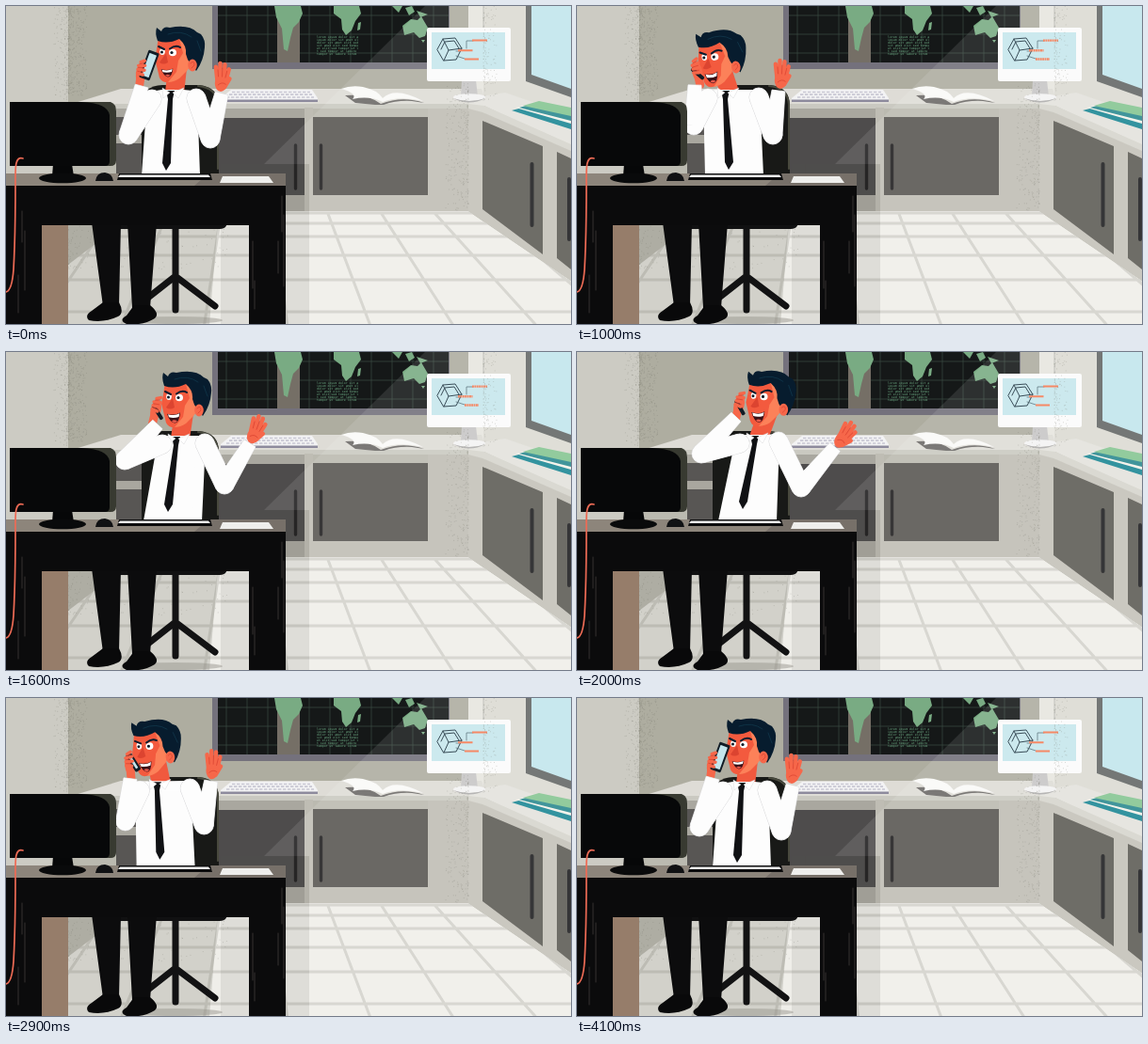
Write an HTML page that moves like this. It is 600 px wide and 338 px high and loops after 4200 ms.

```html
<!DOCTYPE html>
<html lang="en">
<head>
<meta charset="utf-8">
<title>Office call</title>
<style>
html, body { margin: 0; width: 100%; height: 100%; overflow: hidden; background: #aeada0; }
svg { display: block; width: 100%; height: 100%; }
.line { fill: none; stroke-linecap: round; stroke-linejoin: round; }
.green { fill: #79ab83; }
.tiny { font: 3.2px "DejaVu Sans Mono", monospace; fill: #6fae86; }
.skin { fill: #f6674a; }
.finger { stroke: #f6674a; stroke-width: 4.4; }
.crease { stroke: #d8402f; stroke-width: .7; }
.sleeve { fill: #fdfdfd; }
.seam { fill: none; stroke: #d8d8da; stroke-width: 1; }
</style>
</head>
<body>
<svg viewBox="0 0 600 338" preserveAspectRatio="none">
<defs>
  <clipPath id="floorClip"><path d="M0 218H491L600 292V338H0Z"/></clipPath>
  <clipPath id="screenClip"><path d="M225 0H470V60H225Z"/></clipPath>
</defs>

<!-- walls and window -->
<path fill="#aeada0" d="M0 0H500V230H0Z"/>
<path fill="#cccbc3" d="M0 0H66V280H0Z"/>
<path fill="#dbdad2" d="M491 0H600V160H491Z"/>
<path fill="#e6e5df" d="M491 0H507V100H491Z"/>
<path fill="#646866" d="M552 0H600V97L552 80Z"/>
<path fill="#c2e5ec" d="M558 0H600V88L558 73Z"/>

<!-- floor -->
<g clip-path="url(#floorClip)">
  <path fill="#efeee9" d="M0 218H600V338H0Z"/>
  <path id="tiles" class="line" stroke="#d3d2cc" stroke-width="3"/>
</g>
<path fill="#c0beb5" d="M0 218H140L66 275H0Z"/>
<path fill="#77746a" opacity=".24" d="M66 218H226L216 338H66Z"/>

<!-- wall screen -->
<path fill="#74717c" d="M219 0H471V67H219Z"/>
<g clip-path="url(#screenClip)">
  <path fill="#151818" d="M225 0H470V60H225Z"/>
  <path id="grid" class="line" stroke="#3a4d44" stroke-width=".7"/>
  <path fill="#756f66" d="M288 0H312V60H288Z"/>
  <path class="green" d="M285 0H313L315 8L311 17L305 23L302 34L299 48L295 46L293 24L287 12Z"/>
  <path class="green" d="M348 0H375L377 8L371 16L367 26L361 31L357 25L356 14L348 8Z"/>
  <path class="green" d="M374 18L377 17L376 25L373 26Z M410 0H421L417 7Z M424 2L431 0L434 6L428 10Z M436 5L448 9L440 12Z"/>
  <path class="green" d="M421 21L430 14L437 15L441 11L448 23L445 32L439 34L433 28L423 31Z M441 36L445 36L443 39Z"/>
  <g id="notes" class="tiny"></g>
</g>

<!-- back counter -->
<path fill="#bbbab0" d="M66 104H491V218H66Z"/>
<path fill="#a9a79f" d="M117 108H322V218H117Z"/>
<path fill="#dedcd6" d="M70 104L122 88H505L512 108H70Z"/>
<path fill="#cac9c1" d="M70 104H508V109H70Z"/>
<path fill="#585654" d="M117 118H146V137H117Z M117 146H146V180H117Z"/>
<path fill="#4e4c4c" d="M222 119H317V201H222Z"/>
<path fill="#595752" d="M326 118H448V201H326Z"/>
<path fill="#bfbdb4" d="M317 108H326V218H317Z M448 109H491V218H448Z M326 201H491V218H326Z"/>
<path class="line" stroke="#201f20" stroke-width="3.4" d="M307.5 148V194M334.5 148V194"/>

<!-- side counter -->
<path fill="#e3e2dc" d="M491 98L530 92L600 116V160L508 109L491 106Z"/>
<path fill="#c4c2b9" d="M491 106H508L600 152V292L491 218Z"/>
<path fill="#d6d5cd" d="M491 104L508 106L600 147V154L506 113L491 109Z"/>
<path fill="#5e5c56" d="M506 122L570 149V264L506 216Z M585 155L600 162V280L585 268Z"/>
<path class="line" stroke="#1e1e20" stroke-width="4" d="M558.5 168V233M598 184V248"/>

<!-- things on the counters -->
<path fill="#1c8794" d="M537 111L560 105L600 121V131Z"/>
<path fill="#f2f1e9" d="M541 108L563 103L600 118V125Z"/>
<path fill="#2b8990" d="M545 108L562 103L600 116V122Z"/>
<path fill="#86c592" d="M549 106L566 101L600 108V117Z"/>
<path fill="#f3f3f4" d="M239 89H325L331 98V102H228V98Z"/>
<path fill="#8e8b9d" d="M228 99.500H331V102H228Z"/>
<path class="line" stroke="#c9c8d4" stroke-width="1.7" stroke-dasharray="3.4 1.6" style="stroke-linecap:butt" d="M240 91.5H323M237 94.2H325M234 97H327"/>
<path fill="#6c6a67" d="M360 95Q384 93 398 104Q421 95 444 103L431 101Q415 100 401 105H392L371 103Z"/>
<path fill="#f9f9f7" d="M356 88Q366 84 379 86Q394 89 400 98Q413 85 443 101Q418 95 400 102Q386 95 368 99Q374 93 356 88Z"/>
<path fill="#c7c6c6" d="M484 79H499L501 96H483Z"/>
<ellipse cx="492" cy="97" rx="17" ry="3.8" fill="#f3f3f3"/>
<path fill="#aeadac" d="M475 98Q492 104 509 98Q492 107 475 98"/>
<path class="line" stroke="#bbbab5" d="M507 0V24"/>
<rect x="447" y="23" width="89" height="57" rx="2" fill="#fafafa"/>
<rect x="452" y="28" width="78" height="39" fill="#c6e6ec"/>
<path class="line" stroke="#233945" d="M458 46L464 35L477 34L484 45L478 57L465 58ZM464 35L470 47L465 58M470 47L484 45M462 46L466 38L476 37L481 45"/>
<path class="line" stroke="#405b66" stroke-width=".7" d="M489 45V37H496M478 48H482M478 53L487 56"/>
<path id="labels" class="line" stroke="#f57b54" style="stroke-linecap:butt" d="M495 36.6H511M480 47.2H495.500M487 56.5H502"/>

<!-- light, shade and grain -->
<path fill="#fff" opacity=".1" d="M445 0H600V338H322V168H274Z"/>
<path fill="#55524d" opacity=".11" d="M228 168H322V338H228Z"/>
<path id="grain" class="line" stroke="#77756d" stroke-width=".7" opacity=".42"/>

<!-- chair and legs -->
<ellipse cx="180" cy="334" rx="50" ry="4" fill="#99978f" opacity=".5"/>
<path fill="#181917" d="M144 183V103Q145 85 166 84H205Q226 86 226 106V183Z"/>
<path class="line" stroke="#48493d" stroke-width="2" d="M204 85Q224 87 225 105V173"/>
<path class="line" stroke="#121213" stroke-width="7" d="M180 236V323M180 287L147 313M181 288L222 319"/>
<path fill="#111112" d="M118 226H235Q236 237 227 237H118Z"/>
<path fill="#0c0c0d" d="M91 230H122L120 319H103Z M129 230H160L153 321H134Z"/>
<path fill="#09090a" d="M103 315H120Q126 326 119 330Q104 337 88 334Q83 329 91 324Z M136 318H153Q164 327 158 332Q145 340 128 338Q119 334 128 329Z"/>

<!-- caller -->
<g id="caller">
  <path id="neck" class="line" stroke="#f0593e" stroke-width="20" style="stroke-linecap:butt"/>
  <path id="torso" class="sleeve" stroke="#fdfdfd" stroke-width="10" stroke-linejoin="round"/>
  <path id="tie" fill="#101114"/>
  <path id="collar" fill="#fff" stroke="#d8d8da" stroke-width=".5"/>
  <g id="rightHand">
    <ellipse class="skin" cy="-8" rx="6.500" ry="9"/>
    <path class="line finger" d="M-4 -11L-6 -25M-1 -12L-1.500 -29M3 -12L3.500 -28M5 -10L8 -23M4 -4L9 -13"/>
    <path class="line crease" d="M-3 -15L-3.700 -22M1 -15L1 -24M4.500 -14L6 -21M-3 -6Q1 -10 5 -7"/>
  </g>
  <g id="head">
    <path fill="#f35a3e" d="M-18 -47L-20 -34L-22 -24L-18 -8Q-17 0 -11 1Q-2 1 4 -3L14 -14L17 -38L4 -47Z"/>
    <path fill="#fc8159" d="M4 -45L12 -38L13 -24L16 -18L13 -12L4 -3Q-2 1 -8 1L1 -10L3 -22L8 -30Z"/>
    <path fill="#071c2e" d="M-19 -43Q-22 -51 -20 -57L-15 -53Q-13 -59 -6 -57Q14 -61 23 -52L27 -50Q32 -44 31 -36Q30 -22 22 -11L18 -16L13 -23L11 -29Q12 -38 4 -45Q-8 -39 -19 -43Z"/>
    <path class="line" stroke="#123b50" stroke-width=".7" d="M-8 -50Q6 -55 17 -47M23 -43L27 -32"/>
    <ellipse cx="18" cy="-17" rx="4.800" ry="6.500" fill="#f6674a"/>
    <path class="line crease" d="M16 -19Q20 -23 20 -17L17 -14"/>
    <ellipse cx="-14" cy="-31.500" rx="2.800" ry="3.600" fill="#fff"/>
    <ellipse cx="-3" cy="-30.500" rx="4" ry="3.800" fill="#fff"/>
    <circle cx="-14.500" cy="-31" r="1.500" fill="#101b27"/>
    <circle cx="-4" cy="-30.500" r="1.600" fill="#101b27"/>
    <path class="line" stroke="#071c2e" stroke-width="2" d="M-18 -37L-12 -34M-6 -34.500Q0 -39 5 -36"/>
    <path fill="#dc4430" d="M-10 -30L-17 -20Q-13 -17 -8 -20Z"/>
    <g id="mouth">
      <path fill="#3b1117" d="M-7 -3Q1 -1 7 -4Q6 6 1 6Q-4 5 -7 -3Z"/>
      <path fill="#fff" d="M-6 -2.600Q1 -.7 6.300 -3.300L5.500 0Q0 1.500 -5 .3Z"/>
      <path fill="#e7594c" d="M-2 4Q0 2 4 4Q1 7 -2 4"/>
    </g>
  </g>
  <path id="rightSeam" class="seam"/>
  <path id="rightArm" class="sleeve"/>
  <g id="leftHand">
    <ellipse class="skin" cx="-1" cy="4" rx="5.500" ry="11"/>
    <path class="line finger" d="M-1 8V18" style="stroke-width:9"/>
  </g>
  <g id="phone">
    <rect id="phoneBody" rx="1.600" fill="#111c26"/>
    <rect id="phoneGlass" rx=".5" fill="#c4e5ec"/>
  </g>
  <g id="leftFingers">
    <path class="line finger" style="stroke-width:3.400" d="M-3 -8L1 -10M-5 -4L2 -5M-5 0L2 0M-5 4L1 5"/>
    <path class="line crease" d="M-4 -6L1 -7.500M-5 -2L1 -2.500M-5 2L1 2.500"/>
  </g>
  <path id="leftSeam" class="seam"/>
  <path id="leftArm" class="sleeve"/>
</g>

<!-- desk -->
<path fill="#967d6a" d="M38 230H66V338H38Z"/>
<path fill="#8d857b" d="M0 178H297V192H0Z"/>
<path fill="#777069" d="M215 178H297V191H200Z"/>
<path fill="#0b0b0c" d="M0 191H297V338H258V233H38V338H0Z"/>
<path class="line" stroke="#56504b" stroke-width=".6" d="M17 218V251M20 239V302M13 286V326M293 202V240M295 222V298M289 250V284M262 250V300M264 292V322"/>
<path fill="#060708" d="M50 168H70L72 181H49Z"/>
<ellipse cx="60" cy="183" rx="25" ry="5.300" fill="#090a0b"/>
<path fill="#383a31" d="M60 102H111Q117 104 117 112V164Q117 170 111 170H60Z"/>
<path fill="#070809" d="M4 102H80Q108 103 110 116V165Q110 170 105 170H4Z"/>
<path fill="#101113" d="M95 186Q96 177 105 177Q113 178 114 186Z"/>
<path fill="#0c0c0d" d="M120 178H217L219 185H118Z"/>
<path fill="#f3f3f3" d="M121 179.500H215L217 182H119Z"/>
<path fill="#eeeeec" d="M230 181H279L284 188H227Z"/>
<path class="line" stroke="#ee6b55" stroke-width="1.700" d="M18 162C9 159 10 174 10 188C10 215 9 262 8 280C7 294 4 303 0 304"/>
</svg>

<script>
const LOOP = 4200, STEP = 100;
const $ = id => document.getElementById(id);
const set = (id, attrs) => {
  for (const name in attrs) $(id).setAttribute(name, attrs[name]);
};

function buildScenery() {
  let tiles = "", grid = "", grain = "", notes = "";
  for (let k = -7; k < 12; k++) {
    const dx = k * 57 + 25;
    tiles += `M${260 + dx} 221L${260 + dx * 1.54} 338`;
  }
  for (const y of [220, 231, 245, 265, 291, 325]) tiles += `M0 ${y}H600`;
  for (let x = 234; x < 470; x += 22) grid += `M${x} 0V60`;
  for (let y = 10; y < 60; y += 20) grid += `M225 ${y}H470`;

  let seed = 19;
  const random = () => (seed = seed * 16807 % 2147483647) / 2147483647;
  const speckle = (count, x, y, w, h) => {
    while (count--) {
      grain += `M${(x + w * random() ** 2).toFixed(1)} ${(y + h * random()).toFixed(1)}h.1`;
    }
  };
  speckle(380, 66, 0, 20, 95);
  speckle(140, 65, 0, -14, 100);
  speckle(260, 491, 82, -24, 135);
  speckle(130, 507, 0, 14, 100);
  speckle(140, 66, 234, 170, 46);

  const words = "lorem ipsum dolor sit amet elit sed tempor ut labore ";
  for (let i = 0; i < 7; i++) {
    const text = (words + words).slice(i * 6, i * 6 + 23);
    notes += `<text x="330" y="${33.500 + i * 3}">${text}</text>`;
  }
  set("tiles", { d: tiles });
  set("grid", { d: grid });
  set("grain", { d: grain });
  $("notes").innerHTML = notes;
}

// Points are x, y; head, hands and phone add a rotation; phone adds width and length.
const rest = {
  head: [180, 80, 0], mouth: [.9, .9], knot: [174, 92], tip: [170, 175], waist: [175],
  left: [155, 99, 130, 137, 144, 85], right: [202, 98, 217, 141, 229, 93],
  palm: [228, 90, 2], grip: [145, 68, 8], phone: [152, 63, 20, 12, 31]
};
const lean = {
  head: [153, 84, -7], mouth: [1, 1.2], knot: [157, 92], tip: [161, 174], waist: [167],
  left: [139, 98, 124, 127, 125, 84], right: [193, 97, 208, 137, 214, 90],
  palm: [216, 87, 2], grip: [128, 66, -12], phone: [128, 72, -50, 4, 17]
};
const turn = {
  head: [187, 79, 0], mouth: [1, 1.1], knot: [180, 92], tip: [172, 170], waist: [177],
  left: [166, 98, 126, 115, 161, 77], right: [211, 97, 232, 141, 259, 97],
  palm: [260, 96, 20], grip: [161, 58, 14], phone: [161, 64, -32, 4, 18]
};
const reach = {
  head: [201, 78, 1], mouth: [1, 1.2], knot: [188, 91], tip: [176, 167], waist: [181],
  left: [173, 97, 132, 108, 169, 69], right: [214, 95, 238, 144, 274, 101],
  palm: [276, 100, 34], grip: [174, 53, 14], phone: [173, 59, -30, 4, 18]
};
const recoil = {
  head: [147, 82, -7], mouth: [1, 1.2], knot: [153, 91], tip: [160, 170], waist: [167],
  left: [136, 98, 125, 128, 126, 86], right: [192, 95, 207, 132, 212, 86],
  palm: [214, 83, 2], grip: [126, 67, -12], phone: [127, 71, -58, 4, 16]
};
const keys = [
  [0, rest], [800, lean], [1100, lean], [1600, turn], [2000, reach],
  [2100, reach], [2500, recoil], [2650, recoil], [3300, rest], [LOOP, rest]
];

function slope(i, name, j) {
  if (i === 0 || i === keys.length - 1) return 0;
  const rate = k => (keys[k + 1][1][name][j] - keys[k][1][name][j]) / (keys[k + 1][0] - keys[k][0]);
  const a = rate(i - 1), b = rate(i);
  return a * b > 0 ? 2 * a * b / (a + b) : 0;
}

function poseAt(time) {
  const i = keys.findIndex((key, k) => time < keys[k + 1][0]);
  const [t0, from] = keys[i], [t1, to] = keys[i + 1];
  const span = t1 - t0, u = (time - t0) / span, v = 1 - u;
  const pose = {};
  for (const name in from) {
    pose[name] = from[name].map((p, j) =>
      p * v * v * (1 + 2 * u) + to[name][j] * u * u * (3 - 2 * u) +
      span * u * v * (v * slope(i, name, j) - u * slope(i + 1, name, j)));
  }
  return pose;
}

const place = ([x, y, angle]) => ({ transform: `translate(${x} ${y}) rotate(${angle})` });
const disc = (x, y, r) => `M${x - r} ${y}a${r} ${r} 0 1 0 ${2 * r} 0a${r} ${r} 0 1 0 ${-2 * r} 0Z`;

function taper(x1, y1, r1, x2, y2, r2) {
  const length = Math.hypot(x2 - x1, y2 - y1);
  const nx = (y1 - y2) / length, ny = (x2 - x1) / length;
  return `M${x1 + nx * r1} ${y1 + ny * r1}L${x2 + nx * r2} ${y2 + ny * r2}` +
         `L${x2 - nx * r2} ${y2 - ny * r2}L${x1 - nx * r1} ${y1 - ny * r1}Z`;
}

const limb = ([sx, sy, ex, ey, wx, wy]) => ({
  d: disc(sx, sy, 10) + taper(sx, sy, 10, ex, ey, 10) + disc(ex, ey, 10) + taper(ex, ey, 10, wx, wy, 7)
});

function slab(id, w, h) {
  set(id, { x: -w / 2, y: -h / 2, width: w, height: h });
}

function drawCaller(pose) {
  const { head, mouth, knot: [kx, ky], tip: [tx, ty], waist: [wx], left, right, phone } = pose;
  set("head", place(head));
  set("mouth", { transform: `translate(-9 -10) scale(${mouth})` });
  set("neck", { d: `M${head[0] + 2} ${head[1] - 14}L${kx + 5} ${ky}` });
  set("torso", {
    d: `M${left[0]} ${left[1] - 3}L${kx - 8} ${ky + 2}L${kx + 14} ${ky + 2}L${right[0] - 4} ${right[1] - 3}` +
       `L${wx + 26} 180H${wx - 26}Z`
  });
  set("tie", {
    d: `M${kx - 4} ${ky - 2}H${kx + 5}L${kx + 3} ${ky + 7}L${tx + 5} ${ty - 8}L${tx} ${ty}` +
       `L${tx - 4} ${ty - 8}L${kx - 2} ${ky + 7}Z`
  });
  set("collar", {
    d: `M${kx - 8} ${ky - 5}L${kx} ${ky}L${kx - 7} ${ky + 6}ZM${kx + 15} ${ky - 5}L${kx + 3} ${ky}L${kx + 9} ${ky + 6}Z`
  });
  for (const side of ["left", "right"]) {
    set(side + "Seam", limb(pose[side]));
    set(side + "Arm", limb(pose[side]));
  }
  set("rightHand", place(pose.palm));
  set("leftHand", place(pose.grip));
  set("leftFingers", place(pose.grip));
  set("phone", place(phone));
  slab("phoneBody", phone[3], phone[4]);
  slab("phoneGlass", Math.max(0, phone[3] - 4), Math.max(0, phone[4] - 6));
}

function draw(now) {
  const time = Math.floor(now % LOOP / STEP) * STEP;
  drawCaller(poseAt(time));
  const lettered = time >= 700 && time < 1900;
  set("labels", { "stroke-dasharray": lettered ? "1.9 .5" : "none", "stroke-width": lettered ? 2.4 : 2 });
}

buildScenery();
draw(0);
let start;
requestAnimationFrame(function tick(now) {
  start ??= now;
  draw(now - start);
  requestAnimationFrame(tick);
});
</script>
</body>
</html>
```
